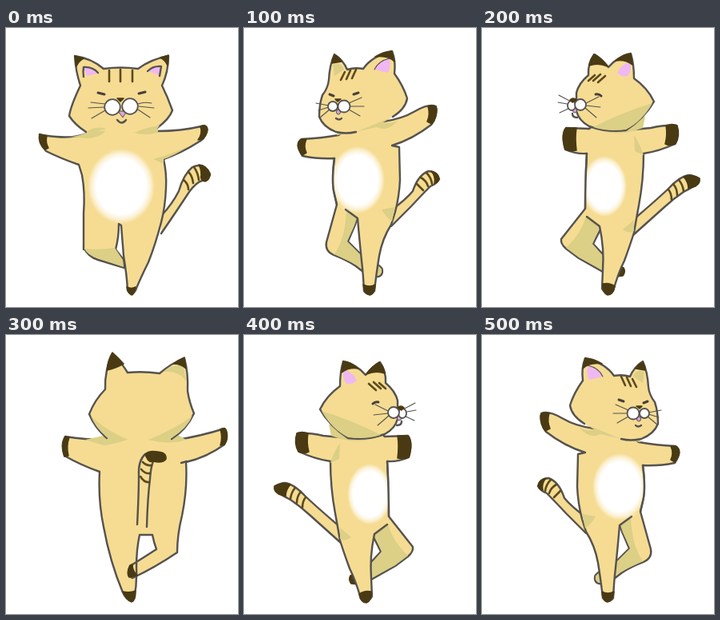
Write an HTML page without scripts that moves like this. It is 290 px wide and 349 px high and loops after 0.6 s.

```html
<!DOCTYPE html>
<html lang="en">
<head>
<meta charset="utf-8">
<title>Spinning cat</title>
<style>
html, body { margin: 0; width: 100%; height: 100%; overflow: hidden; background: #fff; }
svg { display: block; width: 100%; height: 100%; }
.pose { visibility: hidden; animation: show 600ms step-end infinite; }
.p1 { animation-delay: -500ms; }
.p2 { animation-delay: -400ms; }
.p3 { animation-delay: -300ms; }
.p4 { animation-delay: -200ms; }
.p5 { animation-delay: -100ms; }
@keyframes show {
  0% { visibility: visible; }
  16.66%, 100% { visibility: hidden; }
}
.fur, .line { stroke: #55534f; stroke-width: 2.4; stroke-linecap: round; stroke-linejoin: round; }
.fur { fill: #f6dc92; }
.line { fill: none; }
.thin { stroke-width: 1.1; }
.mark { stroke: #5c4a1c; stroke-width: 2.6; }
.eye { stroke: #45413c; stroke-width: 3; }
.shade { fill: #dccf86; }
.tip { fill: #4a3a14; stroke: #4a3a14; stroke-width: 1.5; stroke-linejoin: round; }
.ear { fill: #f0b8f3; }
.belly { fill: url(#glow); }
.muzzle { fill: #fff; stroke: #55534f; stroke-width: 1.8; }
.mouth { fill: #dfa5da; stroke: #55534f; }
</style>
</head>
<body>
<svg viewBox="0 0 290 349">
<defs>
  <radialGradient id="glow">
    <stop offset=".74" stop-color="#fff"/>
    <stop offset=".88" stop-color="#fff" stop-opacity=".6"/>
    <stop offset="1" stop-color="#fff" stop-opacity="0"/>
  </radialGradient>

  <g id="quarter">
    <path class="fur" d="M184 228Q203 214 211 204Q218 183 231 179Q242 180 244 189Q241 195 233 198Q222 209 209 223L184 248"/>
    <path class="tip" d="M234 179Q243 181 244 189Q242 194 238 194Q240 186 234 179Z"/>
    <path class="line mark" d="M228 181q6 6 7 14M221 187q7 4 9 11M216 195l8 8"/>
    <path class="fur" d="M116 221L103 268Q101 279 112 284Q128 290 140 298Q152 308 161 311Q172 313 173 305Q174 300 167 296L144 281L130 267L139 246L142 236"/>
    <path class="shade" d="M128 228L141 238L138 247L129 267L145 283L149 301L134 293L113 283Q127 262 128 228ZM164 296Q174 300 172 306Q168 311 162 310Z"/>
    <path class="fur" d="M127 227L142 238Q144 262 147 291Q149 308 150 329Q156 337 163 329Q165 310 169 285Q173 263 184 246L189 230Q194 211 195 190L194 149L185 147Q211 139 234 121Q242 110 240 98Q231 94 214 104Q197 114 174 117L150 112L118 134Q96 138 72 139Q63 145 73 160Q92 164 113 163Q109 193 113 208L116 221"/>
    <path class="shade" d="M116 132L186 111L174 118Q183 121 193 115Q180 131 166 124Q142 130 116 134ZM172 227l17-3-4 18Q177 236 172 227Z"/>
    <ellipse class="belly" cx="142" cy="190" rx="34" ry="42"/>
    <path class="line" d="M113 163Q109 193 113 208L116 221"/>
    <path class="tip" d="M72 139Q62 145 73 159L78 156Q74 148 78 139ZM230 98Q239 95 241 101Q241 113 235 120L229 117Q233 108 230 98ZM149 321Q157 325 164 321Q163 334 157 334Q150 332 149 321Z"/>
    <path class="fur" d="M140 130Q128 133 115 130Q99 124 94 111Q94 96 98 84Q105 75 106 65Q107 46 113 33Q124 40 129 52Q138 49 149 51Q160 35 185 29Q190 41 188 57Q199 72 204 88Q202 101 186 111"/>
    <path class="shade" d="M111 46Q121 42 125 52L113 60Z"/>
    <path class="ear" d="M182 38Q167 42 163 52L180 56Q184 48 182 38Z"/>
    <path class="line thin" d="M163 52Q168 41 182 38"/>
    <path class="tip" d="M113 34Q110 39 110 44L122 42Q119 36 113 34ZM164 36Q175 29 185 29L188 42Q180 34 164 36Z"/>
    <path class="line mark" d="M126 55l-5 10M133 53l-5 11M140 52l-5 11"/>
    <path class="line eye" d="M107 83l5 2M137 83l6-2"/>
    <path class="line" d="M115 113q4 3 7 0"/>
    <path class="line thin" d="M106 97L90 94M106 99L93 103M107 102L95 112M131 94L147 87M132 98L150 98M131 102L145 110"/>
    <ellipse class="mouth" cx="118" cy="105" rx="2.5" ry="3"/>
    <circle class="muzzle" cx="111" cy="98" r="6"/>
    <circle class="muzzle" cx="125" cy="98" r="7.5"/>
    <path class="tip" d="M114 89h7l-4 3Z"/>
  </g>

  <g id="side">
    <path class="fur" d="M190 239Q216 217 233 201Q248 185 259 184Q273 186 271 193Q264 199 252 205Q240 213 228 224Q209 241 189 259"/>
    <path class="tip" d="M252 186Q261 182 272 188Q273 194 267 198L258 201Q258 193 252 186Z"/>
    <path class="line mark" d="M246 190q5 6 6 14M239 195q5 6 5 14M233 202q4 5 4 13"/>
    <path class="fur" d="M129 226L99 264Q98 270 105 276L121 288L151 305Q168 314 175 308Q180 303 174 298L152 284L139 270L149 250"/>
    <path class="shade" d="M130 235L147 249L138 270L151 285V303L121 287L105 275Q125 256 130 235Z"/>
    <path class="tip" d="M170 300h7q3 5-1 10l-9 1Z"/>
    <path class="fur" d="M131 236L147 248Q153 276 151 303L150 326Q156 337 164 329Q170 307 178 291Q185 272 190 256Q193 238 196 222Q202 190 202 157Q222 154 241 145Q247 133 243 122Q229 121 211 125L179 128L150 112L134 126L105 125Q99 133 104 152Q118 158 131 157Q129 190 129 226"/>
    <path class="shade" d="M139 124L204 111L201 125Q165 139 139 124ZM190 134Q198 146 202 159L191 154ZM176 252l14-12v14Q184 258 176 252Z"/>
    <ellipse class="belly" cx="153" cy="198" rx="28" ry="38"/>
    <path class="line" d="M131 157Q129 190 129 226"/>
    <path class="tip" d="M105 125Q98 134 104 152Q111 155 118 153Q116 138 118 125ZM230 122Q238 119 244 122Q248 135 242 145Q235 148 229 145Q232 134 230 122ZM151 320Q159 318 166 323Q164 334 157 334Q150 331 151 320Z"/>
    <path class="fur" d="M180 128Q204 112 215 92Q207 75 190 63Q190 45 186 32Q169 36 158 49Q150 39 140 33Q132 45 133 59Q121 69 118 81L118 104Q121 116 134 123Q157 131 180 128"/>
    <path class="shade" d="M139 124Q176 105 213 94Q200 117 180 127Q157 130 139 124Z"/>
    <path class="ear" d="M185 42Q173 46 169 56Q176 62 182 60Q188 51 185 42Z"/>
    <path class="tip" d="M141 33Q135 39 134 47Q145 43 157 48Q150 38 141 33ZM167 41Q177 32 186 32L188 46Q179 39 167 41Z"/>
    <path class="line mark" d="M141 59l-8 7M148 58l-9 8M154 60l-9 8"/>
    <path class="line eye" d="M142 83q4-1 7 2"/>
    <path class="line" d="M113 107q0 5 6 5"/>
    <path class="line thin" d="M113 93L96 84M112 96L95 93M112 99L97 106M130 94L146 86M130 97L148 99M129 100L143 112"/>
    <ellipse class="mouth" cx="116" cy="103" rx="2.5" ry="3"/>
    <ellipse class="muzzle" cx="112" cy="97" rx="5" ry="6"/>
    <circle class="muzzle" cx="123" cy="96" r="7"/>
    <path class="tip" d="M110 90q4-4 8 0l-5 3Z"/>
  </g>
</defs>

<g class="pose p0">
  <path class="fur" d="M194 235Q208 220 216 204Q222 183 233 174Q242 170 247 174Q254 178 255 184Q251 192 245 191Q238 193 229 205Q214 228 194 257"/>
  <path class="tip" d="M241 171Q250 171 255 182Q255 190 249 192Q242 190 244 184Q244 176 241 171Z"/>
  <path class="line mark" d="M235 174q5 7 6 16M228 180q5 5 6 14M222 190q6 5 6 12"/>
  <path class="fur" d="M97 274Q102 286 115 290L148 300L147 290L137 277Z"/>
  <path class="fur" d="M97 277L97 232Q99 205 95 184L91 171Q68 163 50 154Q40 143 42 133Q50 135 63 136Q85 138 100 132L145 112L189 129Q219 129 244 123Q252 120 251 130Q248 139 240 143Q220 156 197 164Q201 182 200 200Q199 224 194 243Q187 270 178 293Q168 313 162 328Q157 336 152 328Q151 309 147 285L144 247L141 245Q141 262 137 277"/>
  <path class="shade" d="M98 276Q117 278 136 275L146 290L147 299L114 288Q102 284 98 276Z"/>
  <path class="shade" d="M80 136Q94 135 101 130Q115 124 125 127Q122 136 102 138ZM160 131Q180 122 190 126V131Q174 135 160 131ZM184 164Q206 158 226 149Q210 160 197 164V170Z"/>
  <ellipse class="belly" cx="144" cy="198" rx="42" ry="47"/>
  <path class="tip" d="M42 133Q40 145 49 152L53 150Q49 143 51 135ZM243 123Q251 120 252 127Q251 134 246 139L240 140Q246 132 243 123ZM151 324Q157 327 162 324Q160 334 157 334Q152 332 151 324Z"/>
  <path class="fur" d="M100 130Q86 121 79 110Q81 97 93 72Q87 54 86 35Q107 38 122 51Q143 48 165 51Q181 39 203 35Q203 55 195 72Q202 86 208 103Q204 114 189 125"/>
  <path class="shade" d="M101 129Q116 122 125 126L103 133ZM164 130Q178 123 192 122L187 129Z"/>
  <path class="ear" d="M97 49Q108 49 114 57L101 60ZM193 48Q184 48 178 54L191 59Z"/>
  <path class="line" d="M97 61Q96 54 97 49Q108 48 115 56M192 60L194 48Q184 47 177 54"/>
  <path class="tip" d="M86 35L97 38Q91 41 88 48ZM193 37L203 34L202 47Q199 40 193 37Z"/>
  <path class="line mark" d="M129 53v14M143 52v15M158 53v14"/>
  <path class="line eye" d="M115 81l8 2M166 82l8-2"/>
  <path class="line" d="M139 115q6 7 11 0"/>
  <path class="line thin" d="M124 95L106 93M123 99L103 100M124 103L107 113M165 95Q172 92 182 94M166 98L185 100M165 102L180 112"/>
  <path class="mouth" d="M140 104h11l-5 8Z"/>
  <circle class="muzzle" cx="133" cy="99" r="9.8"/>
  <circle class="muzzle" cx="155" cy="98" r="9.8"/>
  <path class="tip" d="M139 88h8l-4 4Z"/>
</g>

<g class="pose p1"><use href="#quarter"/></g>
<g class="pose p2"><use href="#side"/></g>

<g class="pose p3">
  <path class="fur" d="M124 131Q99 131 74 127Q68 137 73 151Q94 163 117 171Q115 207 122 240Q130 284 146 322Q152 334 160 330Q164 311 163 291Q163 268 167 250H183Q185 260 188 268Q171 279 155 289Q150 300 158 304Q186 291 214 272Q214 250 220 226Q227 192 225 159Q251 153 273 137Q279 126 273 117Q242 127 208 132L165 115Z"/>
  <path class="line" d="M219 160l7-2"/>
  <path class="shade" d="M99 131L130 124L152 131Q134 137 122 138ZM178 131L210 122L225 131Q206 138 178 131Z"/>
  <path class="tip" d="M74 127Q68 138 73 152L78 151Q75 139 79 128ZM268 118Q275 114 276 122Q278 131 273 137L268 138Q271 128 268 118ZM146 321Q155 323 162 320Q162 333 157 334Q149 331 146 321ZM155 288Q150 298 154 303L164 301Q158 295 158 287Z"/>
  <path class="fur" d="M126 129Q111 116 104 99Q111 81 124 68Q123 45 133 23Q144 34 152 47Q172 45 192 48Q207 35 223 29Q228 48 227 70Q229 84 235 98Q226 118 207 130"/>
  <path class="shade" d="M106 101Q120 116 152 131Q137 133 126 128Q111 115 106 101ZM233 101Q214 116 178 131Q195 133 207 129Q227 116 233 101ZM197 46Q210 35 222 39L225 58Q216 44 197 46Z"/>
  <path class="tip" d="M133 22Q127 32 126 44Q136 42 147 36Q140 28 133 22ZM223 28Q216 31 209 36Q219 36 225 42Z"/>
  <path class="line" d="M164 237Q166 199 166 176Q165 157 174 149M176 240Q177 204 180 180Q181 165 184 158"/>
  <path class="tip" d="M174 149Q178 144 190 146Q201 147 200 155Q196 161 184 158Q178 161 174 149Z"/>
  <path class="line mark" d="M171 159q5 5 11 4M169 168q5 6 11 5M168 177q5 8 11 7"/>
</g>

<g class="pose p4"><use href="#side" transform="matrix(-1 0 0 1 310 1)"/></g>
<g class="pose p5"><use href="#quarter" transform="matrix(-1 0 0 1 314 0)"/></g>
</svg>
</body>
</html>
```
